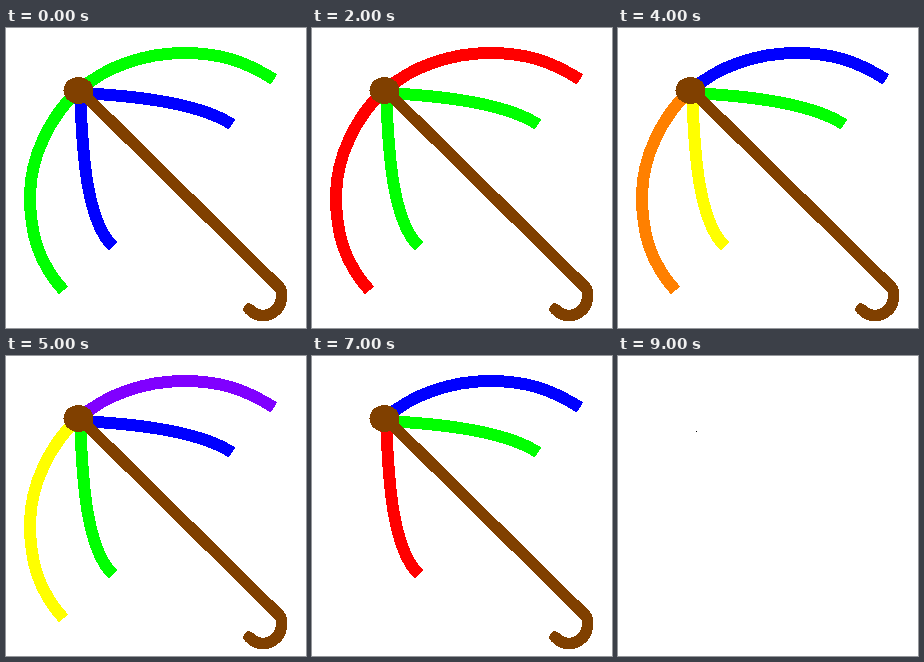
Animation, 300 px wide and 300 px high, one loop 10 s. Source, as an HTML page without scripts:

```html
<!DOCTYPE html>
<html lang="en">
<head>
<meta charset="utf-8">
<title>Umbrella</title>
<style>
  html, body { margin: 0; width: 100%; height: 100%; overflow: hidden; background: #fff; }
  svg { display: block; width: 100%; height: 100%; shape-rendering: crispEdges; }

  :root {
    --red: #f00; --orange: #ff8000; --yellow: #ff0;
    --green: #0f0; --blue: #00f; --purple: #8000ff;
  }

  .rib { fill: none; stroke-width: 12; }
  .rib, .handle, .dot { animation: 10s step-end infinite; }
  .left { animation-name: left; }
  .inner-left { animation-name: inner-left; }
  .inner-right { animation-name: inner-right; }
  .top { animation-name: top; }
  .handle { animation-name: hide; }
  .dot { animation-name: show; }

  /* One colour per second; every rib is gone for the last one. */
  @keyframes left {
    0% { stroke: var(--green); }
    10% { stroke: var(--blue); }
    20% { stroke: var(--red); }
    40% { stroke: var(--orange); }
    50% { stroke: var(--yellow); }
    60% { stroke: var(--green); }
    70% { stroke: transparent; }
    80% { stroke: var(--blue); }
    90%, 100% { stroke: transparent; }
  }
  @keyframes inner-left {
    0% { stroke: var(--blue); }
    10% { stroke: var(--red); }
    20% { stroke: var(--green); }
    30% { stroke: var(--orange); }
    40% { stroke: var(--yellow); }
    50% { stroke: var(--green); }
    60% { stroke: var(--blue); }
    70% { stroke: var(--red); }
    80% { stroke: var(--purple); }
    90%, 100% { stroke: transparent; }
  }
  @keyframes inner-right {
    0% { stroke: var(--blue); }
    10% { stroke: var(--red); }
    20% { stroke: var(--green); }
    30% { stroke: var(--yellow); }
    40% { stroke: var(--green); }
    50% { stroke: var(--blue); }
    60% { stroke: var(--purple); }
    70% { stroke: var(--green); }
    80% { stroke: var(--yellow); }
    90%, 100% { stroke: transparent; }
  }
  @keyframes top {
    0% { stroke: var(--green); }
    10% { stroke: var(--blue); }
    20% { stroke: var(--red); }
    30% { stroke: var(--green); }
    40% { stroke: var(--blue); }
    50% { stroke: var(--purple); }
    60% { stroke: transparent; }
    70% { stroke: var(--blue); }
    80% { stroke: var(--green); }
    90%, 100% { stroke: transparent; }
  }
  @keyframes hide { 0% { opacity: 1; } 90%, 100% { opacity: 0; } }
  @keyframes show { 0% { opacity: 0; } 90%, 100% { opacity: 1; } }
</style>
</head>
<body>
<svg viewBox="0 0 300 300">
  <path class="rib left" d="M72 62.5C45.5 87 24 127.500 24 168S34 236 57.500 262.500"/>
  <path class="rib top" d="M73 62.5C100 38 140 25 178 25S240 34 268 51.5"/>
  <path class="rib inner-left" d="M74 64C76 110 78 191 107 218.5"/>
  <path class="rib inner-right" d="M73 65C115 67 190 73 226 96.5"/>
  <g class="handle" fill="#804000">
    <path d="M73 61.5L273 259Q276.500 263 275.500 271C273.500 283 264 287.5 257 287.5Q249 287.5 243 281"
      fill="none" stroke="#804000" stroke-width="11.5" stroke-linecap="round"/>
    <ellipse cx="72.5" cy="62.5" rx="15" ry="13.5"/>
  </g>
  <rect class="dot" x="78" y="75" width="1" height="1"/>
</svg>
</body>
</html>
```
